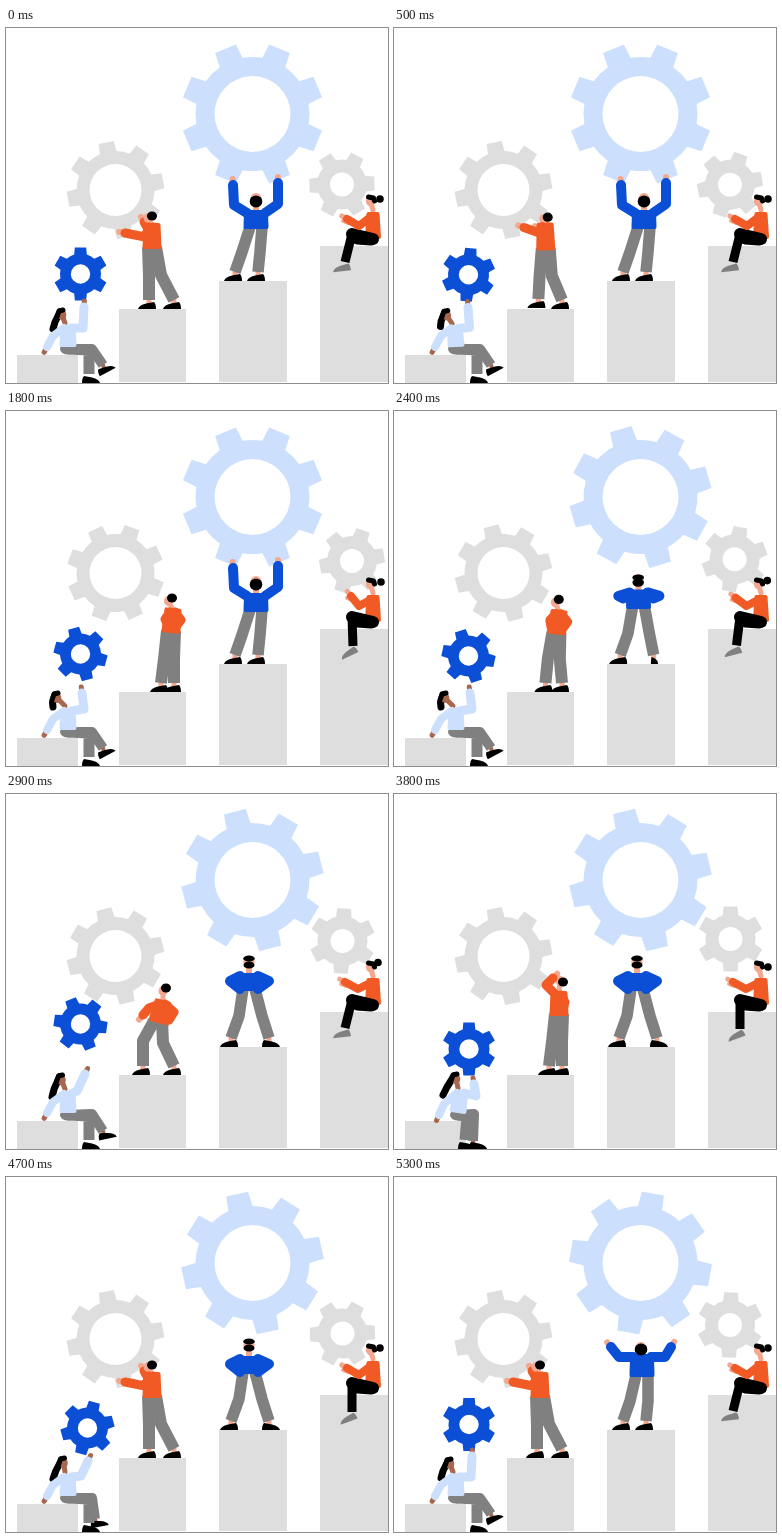
An HTML page that plays this animation: 382x355 px, repeating every 5.4 s.

```html
<!DOCTYPE html>
<html lang="en">
<head>
<meta charset="utf-8">
<title>Gears on steps</title>
<style>
html, body { margin: 0; width: 100%; height: 100%; overflow: hidden; background: #fff; }
svg { display: block; width: 382px; height: 355px; }
</style>
</head>
<body>
<svg viewBox="0 0 382 355">
  <g id="gears"></g>
  <g fill="#dfdede">
    <path d="M11 327H72V355H11ZM113 281H180V354H113ZM213 253H281V354H213ZM314 218H382V354H314Z"/>
  </g>
  <g id="people"></g>
</svg>
<script>
const LOOP = 5400, STEP = 100;
const GREY = '#dfdede', BLUE = '#0b4fd6', SKY = '#cce0fd', ORANGE = '#f15a24';
const PANTS = '#808080', BLACK = '#000', SKIN = '#f3a78e', BROWN = '#a9664f';

// ---- drawing helpers ----
const n = v => v.toFixed(2);
const pts = list => 'M' + list.map(p => n(p[0]) + ' ' + n(p[1])).join('L');
const off = (p, x, y) => [p[0] + x, p[1] + y];

const line = (color, width, list, cap = 'round') =>
  `<path d="${pts(list)}" fill="none" stroke="${color}" stroke-width="${width}" stroke-linecap="${cap}" stroke-linejoin="round"/>`;
const oval = (color, p, rx, ry = rx) =>
  `<ellipse cx="${n(p[0])}" cy="${n(p[1])}" rx="${n(rx)}" ry="${n(ry)}" fill="${color}"/>`;

function trunk(color, a, b, wa, wb) {
  const dx = b[0] - a[0], dy = b[1] - a[1], l = Math.hypot(dx, dy) || 1;
  const x = -dy / l / 2, y = dx / l / 2;
  const list = [off(a, x * wa, y * wa), off(b, x * wb, y * wb), off(b, -x * wb, -y * wb), off(a, -x * wa, -y * wa)];
  return `<path d="${pts(list)}Z" fill="${color}" stroke="${color}" stroke-width="4" stroke-linejoin="round"/>`;
}

const shoe = (color, p, dir, turn = 0) =>
  `<path d="M-7 0H11Q10 -4 3 -5.5L-5 -7Q-7 -5 -7 0Z" fill="${color}" transform="translate(${n(p[0])} ${n(p[1])}) rotate(${n(turn)}) scale(${n(dir)} 1)"/>`;

function hand(color, elbow, wrist, width = 6) {
  const dx = wrist[0] - elbow[0], dy = wrist[1] - elbow[1], l = Math.hypot(dx, dy) || 1;
  return line(color, width, [wrist, off(wrist, dx / l * 6, dy / l * 6)]);
}

function leg(hip, knee, foot, width, dir) {
  const ankle = off(foot, 0, -9);
  return line(SKIN, 5, [ankle, off(foot, 0, -5)]) +
    line(PANTS, width, [hip, knee, ankle], 'butt') + shoe(BLACK, foot, dir);
}

function gear(color, cx, cy, r, body, hole, teeth, turn, top, base) {
  const at = (rad, deg) => {
    const a = deg * Math.PI / 180;
    return n(cx + rad * Math.cos(a)) + ' ' + n(cy + rad * Math.sin(a));
  };
  let d = '';
  for (let i = 0; i < teeth; i++) {
    const a = turn - 90 + i * 360 / teeth;
    d += i ? `A${body} ${body} 0 0 1 ` : 'M';
    d += `${at(body, a - base)}L${at(r, a - top)}L${at(r, a + top)}L${at(body, a + base)}`;
  }
  d += `A${body} ${body} 0 0 1 ${at(body, turn - 90 - base)}Z`;
  d += `M${n(cx - hole)} ${n(cy)}a${hole} ${hole} 0 1 0 ${2 * hole} 0a${hole} ${hole} 0 1 0 ${-2 * hole} 0Z`;
  return `<path d="${d}" fill="${color}" fill-rule="evenodd"/>`;
}

// ---- timing ----
const smooth = u => u * u * (3 - 2 * u);
const mix = (a, b, u) => a.map((v, i) => v + (b[i] - v) * u);

function segment(track, t) {
  let i = 0;
  while (i < track.length - 2 && track[i + 1][0] <= t) i++;
  const [a, b] = [track[i], track[i + 1]];
  return [a[1], b[1], Math.min(1, (t - a[0]) / (b[0] - a[0]))];
}
function value(track, t, ease = smooth) {
  const [a, b, u] = segment(track, t);
  return mix(a, b, ease(u));
}
function pose(track, t) {
  const [a, b, u] = segment(track, t), out = {};
  for (const k in a) out[k] = mix(a[k], b[k], smooth(u));
  return out;
}
const linear = u => u;

// ---- gears: rotation, or x, y and rotation ----
const bigTurn = [[0, [-22.5]], [1850, [-22.5]], [2900, [75.5]], [3800, [166.5]], [4700, [257.5]], [5300, [325]], [5400, [337.5]]];
const midTurn = [[0, [-11]], [1000, [79]], [1800, [155]], [2900, [256]], [3800, [349]], [5400, [349]]];
const blueMove = [
  [0, [74.5, 246, 0]], [1000, [74.5, 247.5, 10]], [1800, [74.5, 243, -15]], [2400, [74.5, 245, -18]],
  [2900, [74.5, 230, -22]], [3800, [75, 255, 0]], [4700, [81.5, 251, 15]], [5300, [75, 247.5, 0]], [5400, [74.5, 246, 0]]];
const greyMove = [
  [0, [336, 156.5, 28]], [1000, [336, 157, 11]], [1800, [346, 150, 20]], [2900, [336.5, 147, 3]],
  [3800, [336.5, 145, 0]], [4700, [336.5, 156.5, 28]], [5300, [336, 148, 2]], [5400, [336, 156.5, 28]]];

// ---- poses: h head, g hair, c chest, p pelvis, e/m and E/M elbows and wrists,
// k/f and K/F knees and feet ----
const girl = {
  h: [56, 287], g: [47, 301], c: [62, 299], p: [62, 317], e: [47, 308], m: [41, 319],
  E: [77, 300], M: [78, 279], k: [83, 322], f: [83, 355], K: [86, 321], F: [100, 345], r: [-28]
};
const girlBack = { ...girl, h: [49.5, 288], g: [46, 296], c: [60, 300], E: [74, 299], M: [70, 280] };
const girlWatch = { ...girl, h: [51, 287], g: [47, 296], E: [78, 298], M: [76, 282] };
const girlToss = { ...girl, h: [55.5, 286], g: [46, 303], E: [71, 297], M: [79, 280], K: [86, 320], F: [100, 345], r: [-12] };
const girlCatch = {
  ...girl, h: [62, 285], g: [49, 301], c: [67, 298], p: [64, 317], e: [50, 310], m: [45, 321],
  E: [82, 302], M: [80, 290], k: [73, 322], f: [71, 355], K: [80, 320], F: [82, 355], r: [0]
};
const girlReach = { ...girl, h: [57.5, 286], g: [47, 302], E: [75, 299], M: [82, 284], F: [92, 350], r: [-10] };
const girlTrack = [[0, girl], [1000, girlBack], [1800, girlWatch], [2400, girlWatch], [2900, girlToss],
  [3800, girlCatch], [4700, girlReach], [5300, girl], [5400, girl]];

const push = {
  h: [142, 190], g: [146, 188], c: [146, 197], p: [146, 219], e: [139, 209], m: [119, 205],
  E: [142, 201], M: [138, 194], k: [143, 248], f: [143, 281], K: [155, 247], F: [168, 281]
};
const lean = {
  h: [181, 194], g: [185, 194], c: [172, 195], p: [175, 226], e: [167, 187], m: [174, 177],
  E: [187, 213], M: [180, 229], k: [156, 250], f: [150, 276], K: [169, 250], F: [168, 281]
};
const stand = {
  h: [162.5, 190], g: [166, 187], c: [167, 199], p: [165, 220], e: [159, 208], m: [162, 215],
  E: [175, 209], M: [169, 217], k: [158, 248], f: [155, 281], K: [168, 248], F: [168, 281]
};
const walk = {
  h: [157, 197], g: [160, 194], c: [157, 208], p: [152, 227], e: [143, 214], m: [137, 221],
  E: [168, 218], M: [163, 226], k: [137, 247], f: [137, 281], K: [157, 249], F: [168, 281]
};
const reach = {
  ...stand, h: [166, 187], g: [169, 188], c: [165, 199], p: [165, 220], e: [152, 191], m: [159, 184],
  E: [171, 208], M: [169, 216]
};
const pushTrack = [[0, push], [300, push], [1000, lean], [1800, stand], [2200, stand], [2900, walk],
  [3800, reach], [4500, push], [5400, push]];

const lift = {
  h: [250, 171], g: [250, 172], b: [250, 173.5], s: [6.3, 6], c: [250, 184], p: [250, 199],
  e: [228, 177], m: [227, 157], E: [272, 176], M: [272, 155],
  k: [236, 224], f: [229, 253], K: [254, 224], F: [252, 253], d: [-1]
};
const open = {
  ...lift, h: [247, 171], g: [247, 171], b: [247, 172.5], c: [248, 179], p: [248, 198],
  e: [225, 180], m: [217, 170], E: [271, 180], M: [277, 170], k: [236, 224]
};
const akimbo = {
  ...lift, h: [243, 168], g: [243, 164.5], b: [243, 171], s: [5.5, 3.6], c: [243, 181], p: [243, 195],
  e: [224, 187], m: [234, 195], E: [263, 187], M: [252, 195],
  k: [233, 222], f: [225, 253], K: [256, 222], F: [263, 253], d: [1]
};
const liftTrack = [[0, lift], [1850, lift], [2050, open], [2600, akimbo], [4800, akimbo], [5300, open], [5400, lift]];

const sit = {
  h: [364.5, 173], g: [374, 171], c: [367, 186], p: [367, 209], e: [353, 198], m: [341, 191],
  k: [346, 206], f: [338, 243], r: [-6]
};
const sitHigh = { ...sit, g: [375, 171], e: [353, 195], m: [345, 185], f: [346, 244], r: [-25] };
const sitFree = { ...sit, g: [372, 168.5], e: [352, 195], m: [339, 188] };
const sitSwing = { ...sitFree, g: [374, 173], f: [345, 244], r: [-20] };
const sitHold = { ...sit, f: [345, 244], r: [-20] };
const sitTrack = [[0, sit], [1000, sit], [1800, sitHigh], [2900, sitFree], [3800, sitSwing], [4700, sitHold], [5300, sit], [5400, sit]];

// ---- people ----
function drawGirl(q) {
  const hip = off(q.p, 0, 4), ankle = off(q.F, -3, -8);
  return line(BLACK, 7, [off(q.h, -2, -3), mix(off(q.h, -5, 0), q.g, 0.5), q.g]) +
    hand(BROWN, q.e, q.m, 5) + hand(BROWN, q.E, q.M, 5) +
    line(BROWN, 4, [ankle, off(q.F, -2, -4)]) + shoe(BLACK, q.F, 1, q.r[0]) +
    line(PANTS, 10, [hip, q.K, ankle], 'butt') +
    line(PANTS, 11, [hip, q.k, off(q.f, 0, -9)], 'butt') + shoe(BLACK, q.f, 1) + oval(PANTS, hip, 8, 5.5) +
    line(BROWN, 5, [q.h, off(q.c, -3, -4)]) + trunk(SKY, q.c, q.p, 11, 13) +
    line(SKY, 8, [off(q.c, -4, 1), q.e, q.m]) + line(SKY, 9, [off(q.c, 3, 1), q.E, q.M]) +
    oval(BROWN, q.h, 4.3, 5) + line(BLACK, 5, [off(q.h, -5, 2), off(q.h, -3, -4), off(q.h, 1, -5)]);
}

function drawPusher(q) {
  return hand(SKIN, q.e, q.m) + hand(SKIN, q.E, q.M) +
    leg(off(q.p, 4, 0), q.K, q.F, 12, -1) + leg(off(q.p, -4, 0), q.k, q.f, 12, -1) +
    line(SKIN, 5, [q.h, q.c]) +
    line(ORANGE, 9, [off(q.c, 2, 2), q.E, q.M]) + trunk(ORANGE, q.c, q.p, 13, 15) +
    oval(SKIN, q.h, 4.5, 5) + oval(BLACK, q.g, 5, 4.6) +
    line(ORANGE, 9, [off(q.c, -3, 2), q.e, q.m]);
}

function drawLifter(q) {
  return hand(SKIN, q.e, q.m) + hand(SKIN, q.E, q.M) +
    leg(off(q.p, 6, 0), q.K, q.F, 11.5, q.d[0]) + leg(off(q.p, -6, 0), q.k, q.f, 11.5, -1) +
    line(SKIN, 6, [q.h, q.c]) + trunk(BLUE, q.c, q.p, 20, 21) +
    line(BLUE, 10, [off(q.c, -9, 1), q.e, q.m]) + line(BLUE, 10, [off(q.c, 9, 1), q.E, q.M]) +
    oval(SKIN, q.h, 5.6, 6) + oval(BLACK, q.g, 5.8, 3) + oval(BLACK, q.b, q.s[0], q.s[1]);
}

function drawSitter(q) {
  const ankle = off(q.f, 1, -9);
  return hand(SKIN, q.e, q.m, 5) + line(SKIN, 4, [off(q.m, 1, 4), off(q.m, -4, 2)]) +
    shoe(PANTS, q.f, -1, q.r[0]) + line(SKIN, 5, [q.h, off(q.c, 0, -4)]) +
    trunk(ORANGE, q.c, q.p, 9, 12) +
    line(BLACK, 12, [off(q.p, 0, 2), q.k]) + line(BLACK, 9, [q.k, ankle], 'butt') +
    line(BLACK, 11, [off(q.p, -2, 3), off(q.k, 5, 5)]) +
    line(ORANGE, 8, [off(q.c, -1, 2), q.e, q.m]) +
    oval(SKIN, q.h, 4.6, 5.2) + line(BLACK, 5, [off(q.h, -2, -4), off(q.h, 3, -3), off(q.h, 4, 0)]) + oval(BLACK, q.g, 3.8);
}

// ---- one picture for a given time ----
const gears = document.getElementById('gears');
const people = document.getElementById('people');

function draw(t) {
  const [bx, by, ba] = value(blueMove, t);
  const [gx, gy, ga] = value(greyMove, t);
  gears.innerHTML =
    gear(SKY, 246.5, 86, 71.5, 57, 38, 8, value(bigTurn, t, linear)[0], 9, 12.5) +
    gear(GREY, 109.5, 162, 49, 39, 26, 8, value(midTurn, t, linear)[0], 9, 12.5) +
    gear(GREY, gx, gy, 33.2, 25, 12, 6, ga, 12, 18) +
    gear(BLUE, bx, by, 27.2, 20.5, 9.7, 6, ba, 12, 18);
  people.innerHTML =
    drawGirl(pose(girlTrack, t)) + drawPusher(pose(pushTrack, t)) +
    drawLifter(pose(liftTrack, t)) + drawSitter(pose(sitTrack, t));
}

let last = -1;
function tick() {
  const t = Math.floor(performance.now() % LOOP / STEP) * STEP;
  if (t !== last) draw(last = t);
  requestAnimationFrame(tick);
}
tick();
</script>
</body>
</html>
```
